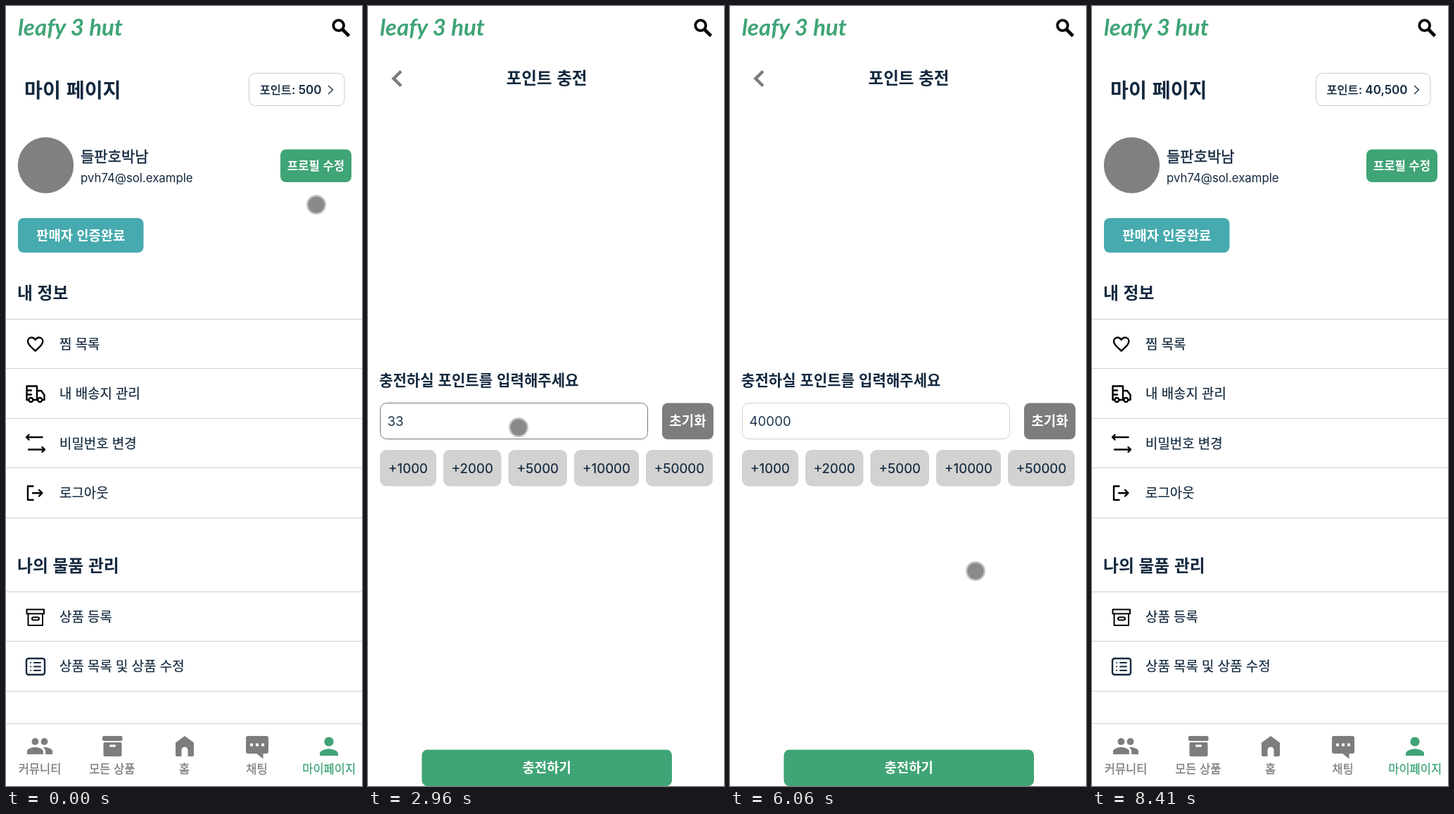
Recreate the animation shown at these times as an HTML page. Size 506 by 1107 pixels, loop 9140 ms.

```html
<!DOCTYPE html>
<html lang="ko">
<head>
<meta charset="utf-8">
<title>포인트 충전</title>
<style>
  html, body { margin: 0; width: 100%; height: 100%; overflow: hidden; background: #fff; }
  svg { display: block; width: 506px; height: 1107px; }
  text { font-family: "Noto Sans CJK KR", "Noto Sans KR", "Noto Sans CJK", sans-serif; white-space: pre; }
  .num { font-family: Inter, sans-serif; }
  .brand { font: italic 700 33px Lato, sans-serif; fill: #3fa476; }
  .line { fill: none; stroke: #000; stroke-width: 2.4; stroke-linecap: round; stroke-linejoin: round; }
  .thin { stroke-width: 2; }
  .navy { stroke: #14293f; }
  .rule { stroke: #d0d0d0; }
  .tab { fill: #7d7d7d; }
  .on { fill: #3fa476; }
</style>
</head>
<body>
<svg viewBox="0 0 506 1107">
  <text class="brand" x="17" y="42">leafy 3 hut</text>
  <g fill="none" stroke="#000">
    <circle cx="472.7" cy="27.6" r="7.4" stroke-width="3.8"/>
    <path d="M478.5 33.5L487.5 42.5" stroke-width="4.6"/>
  </g>
  <g id="my"></g>
  <g id="charge"></g>
  <g id="pointer">
    <circle r="14" fill="#3c3c3c" fill-opacity=".3"/>
    <circle r="11.6" fill="#3a3a3a" fill-opacity=".42"/>
  </g>
</svg>
<script>
const LOOP = 9140, STEP = 67.3, ROW = 70.45;
const NAVY = '#14293f', GREEN = '#3fa476', GRAY = '#7d7d7d';
const $ = id => document.getElementById(id);

// Text centred vertically on cy; `thick` adds a hairline outline for in-between weights.
function label(s, x, cy, size, o = {}) {
  const { fill = NAVY, weight = 400, anchor = 'start', cls = '', id = '', thick = 0 } = o;
  return `<text x="${x}" y="${cy + size * .38}" font-size="${size}" font-weight="${weight}" text-anchor="${anchor}"` +
    ` class="${cls}" id="${id}" fill="${fill}" stroke="${fill}" stroke-width="${thick}">${s}</text>`;
}
const bold = { weight: 700 };
const mid = (fill, weight = 400, thick = 0) => ({ fill, weight, thick, anchor: 'middle' });
const box = (x, y, w, h, r, fill, extra = '') =>
  `<rect x="${x}" y="${y}" width="${w}" height="${h}" rx="${r}" fill="${fill}" ${extra}/>`;
const button = (x, y, w, h, fill, s, size) =>
  box(x, y, w, h, 8, fill) + label(s, x + w / 2, y + h / 2, size, mid('#fff', 700));
const line = (d, cls = '', extra = '') => `<path class="line ${cls}" d="${d}" ${extra}/>`;

// A heading and rows of equal height separated by rules.
function section(title, top, rows) {
  const rule = (_, i) => `<path class="rule" d="M0 ${Math.floor(top + i * ROW) + .5}H506"/>`;
  return label(title, 16, top - 38, 23.8, bold) + [...rows, ''].map(rule).join('') +
    rows.map((s, i) => label(s, 76, top + (i + .5) * ROW, 18.9, { thick: .2 })).join('');
}

const menuIcons =
  line('M12 20C6 14.7 3 12 3 8.5 3 5.9 5 4 7.5 4 9.3 4 11 5 12 6.8 13 5 14.7 4 16.5 4 19 4 21 5.9 21 8.5 21 12 18 14.7 12 20Z',
    'thin', 'transform="translate(27.4 465.7) scale(1.19)"') +
  line('M32 559H29.5V539.5H44V559H38.5M44 546H50L54.5 552V559H51.5M45 559H44M30 545.5H36M30 551.5H36') +
  '<g class="line"><circle cx="35.3" cy="559" r="3"/><circle cx="48.2" cy="559" r="3"/></g>' +
  line('M29.5 612H51.5M32.5 608.5L29 612L32.5 615.5M32 629.5H54.5M51.5 626L55 629.5L51.5 633') +
  line('M38.5 681.5H31V701H38.5M38 691.2H51M47 686.8L51.4 691.2L47 695.6') +
  line('M29.5 856.5H54V862.5H29.5ZM31.5 863V879H52V863M39 867.5H45A2 2 0 0 1 45 871.5H39A2 2 0 0 1 39 867.5', 'thin') +
  box(29, 926, 26, 23, 3, 'none', 'class="line navy"') +
  [932, 937.5, 943].map(y => line(`M35 ${y}h.1M40 ${y}h9`, 'thin navy')).join('');

const tabIcons =
  '<g class="tab"><g transform="translate(28.3 1030.8) scale(1.64)">' +
  '<circle cx="8" cy="8" r="3"/><circle cx="16" cy="8" r="3"/>' +
  '<path d="M1 19V16.5C1 14.2 5.7 13 8 13S15 14.2 15 16.5V19ZM15 13.05C19 12.7 23 14.3 23 16.5V19H17V16.5C17 15 16.2 13.9 15 13.05Z"/></g>' +
  box(137, 1036, 28.5, 7, 2, GRAY) + box(138.5, 1045, 26, 20, 2, GRAY) + box(147, 1048.5, 9, 3, 1, '#fff') +
  '<path d="M254 1036L267 1045.5V1063Q267 1065 265 1065H258.5V1056A4.5 4.5 0 0 0 249.5 1056V1065H243Q241 1065 241 1063V1045.5Z"/>' +
  box(341, 1036, 32, 25, 3, GRAY) + '<path d="M355 1060L365.5 1068.5V1060Z"/>' +
  [-8, 0, 8].map(dx => box(355 + dx, 1046.5, 4, 4, .5, '#fff')).join('') + '</g>' +
  '<g class="on"><circle cx="459" cy="1044" r="6.6"/><path d="M446 1064V1061C446 1056.7 454.7 1054.3 459 1054.3S472 1056.7 472 1061V1064Z"/></g>';

const tabs = ['커뮤니티', '모든 상품', '홈', '채팅', '마이페이지'];

$('my').innerHTML =
  label('마이 페이지', 26, 119, 28.2, bold) +
  '<rect id="pill" y="95.5" height="46" rx="9" fill="none" stroke="#ccc"/>' +
  label('포인트<tspan id="points" class="num" font-size="17" font-weight="600" stroke="none"></tspan>',
    448.5, 118.8, 16.4, { anchor: 'end', thick: .45 }) +
  line('M458.5 113.5L464.5 119L458.5 124.5', 'navy', 'style="stroke-width:1.3"') +
  '<circle cx="56.5" cy="226" r="39.7" fill="#808080"/>' +
  label('들판호박남', 106, 213, 21, { thick: .45 }) +
  label('pvh74@sol.example', 106, 243.8, 16.8, { cls: 'num' }) +
  button(390, 203.5, 101, 46.5, GREEN, '프로필 수정', 16.7) +
  button(17, 301, 178.5, 49, '#47aaae', '판매자 인증완료', 18.8) +
  section('내 정보', 444.5, ['찜 목록', '내 배송지 관리', '비밀번호 변경', '로그아웃']) +
  section('나의 물품 관리', 831.5, ['상품 등록', '상품 목록 및 상품 수정']) +
  '<path class="rule" d="M0 1018.5H506"/>' + menuIcons + tabIcons +
  tabs.map((s, i) => label(s, 48 + i * 102.8, 1083, 16.5, mid(i === 4 ? GREEN : GRAY, 400, .3))).join('');

let right = 7;
const amounts = { 1000: 80, 2000: 82.5, 5000: 83.5, 10000: 92, 50000: 95 };
const amountRow = Object.entries(amounts).map(([n, w]) => {
  const x = right + 10;
  right = x + w;
  return box(x, 630, w, 51.5, 9, '#d2d2d1') + label('+' + n, x + w / 2, 656, 18.9, { ...mid(NAVY, 400, .2), cls: 'num' });
}).join('');

$('charge').innerHTML =
  `<path d="M47 92.5L36.5 103L47 113.5" fill="none" stroke="${GRAY}" stroke-width="4.5"/>` +
  label('포인트 충전', 254, 102, 23.6, mid(NAVY, 700)) +
  label('충전하실 포인트를 입력해주세요', 16, 531, 21.1, bold) +
  box(17.5, 563.5, 380, 51, 9, '#fff', 'id="field"') +
  label('충전할 포인트 입력', 27, 589, 18.9, { fill: '#cacaca', id: 'hint' }) +
  label('', 27.5, 589, 18.7, { cls: 'num', id: 'value', fill: '#20364c' }) +
  box(0, 577, 1, 24, 0, NAVY, 'id="caret"') +
  button(418, 563.5, 73, 51.5, GRAY, '초기화', 19) + amountRow +
  button(76.5, 1055.5, 355.5, 51.5, GREEN, '충전하기', 18.9);

// Pointer strokes: start, end, then the points passed at an even pace.
const strokes = [
  [0, 0, [441, 282]],
  [0, 740, [372, 330], [303, 338], [282, 297], [348, 196], [420, 123]],
  [1010, 1480, [303, 338], [154, 604]],
  [1480, 2080, [214, 598]],
  [3365, 3960, [190, 598], [194, 652]],
  [4040, 4330, [240, 660]],
  [4370, 4845, [188, 725], [172, 673]],
  [4845, 4980, [172, 666]],
  [5250, 5515, [386, 721]],
  [5660, 6055, [385, 745], [349, 802]],
  [6190, 6595, [330, 955], [256, 1080]],
  [6670, 6860, [232, 1092]],
  [7537, 8345, [369, 844]]
];
const typing = { 2420: '3', 2560: '33', 3230: '330', 3430: '3300', 3570: '33000', 4400: '38000', 5060: '40000' };
const within = (t, a, b) => t >= a && t < b;
const show = (id, on) => { $(id).style.display = on ? '' : 'none'; };

function pointerAt(t) {
  const n = strokes.filter(s => s[0] <= t).length - 1;
  const [from, to, ...stops] = strokes[n];
  const points = n ? [strokes[n - 1].at(-1), ...stops] : stops;
  const p = Math.min(1, (t - from) / (to - from || 1)) * (points.length - 1);
  const i = Math.floor(p), a = points[i], b = points[i + 1] || a;
  return a.map((v, k) => v + (b[k] - v) * (p - i));
}

function draw(t) {
  const rich = t >= 6940, charging = within(t, 885, 6940);
  show('my', !charging);
  show('charge', charging);

  const left = rich ? 318.5 : 345.5;
  $('pill').setAttribute('x', left);
  $('pill').setAttribute('width', 481 - left);
  $('points').textContent = rich ? ': 40,500' : ': 500';

  const last = Object.keys(typing).filter(k => k <= t).pop();
  const text = last ? typing[last] : '';
  const focus = within(t, 2020, 4400);
  $('value').textContent = text;
  show('hint', !text);
  $('field').setAttribute('stroke', focus ? '#777' : '#d0d0d0');
  $('caret').setAttribute('x', 28 + 12 * text.length);
  show('caret', focus && !within(t, 2960, 3230));

  // The pointer is refreshed at a fixed, slow rate.
  const tick = Math.floor((t + 4) / STEP) * STEP;
  $('pointer').setAttribute('transform', `translate(${pointerAt(tick)})`);
  show('pointer', !within(tick, 1270, 1400) && tick < 8400);
}

const start = performance.now();
function frame() {
  draw((performance.now() - start) % LOOP);
  requestAnimationFrame(frame);
}
frame();
</script>
</body>
</html>
```
